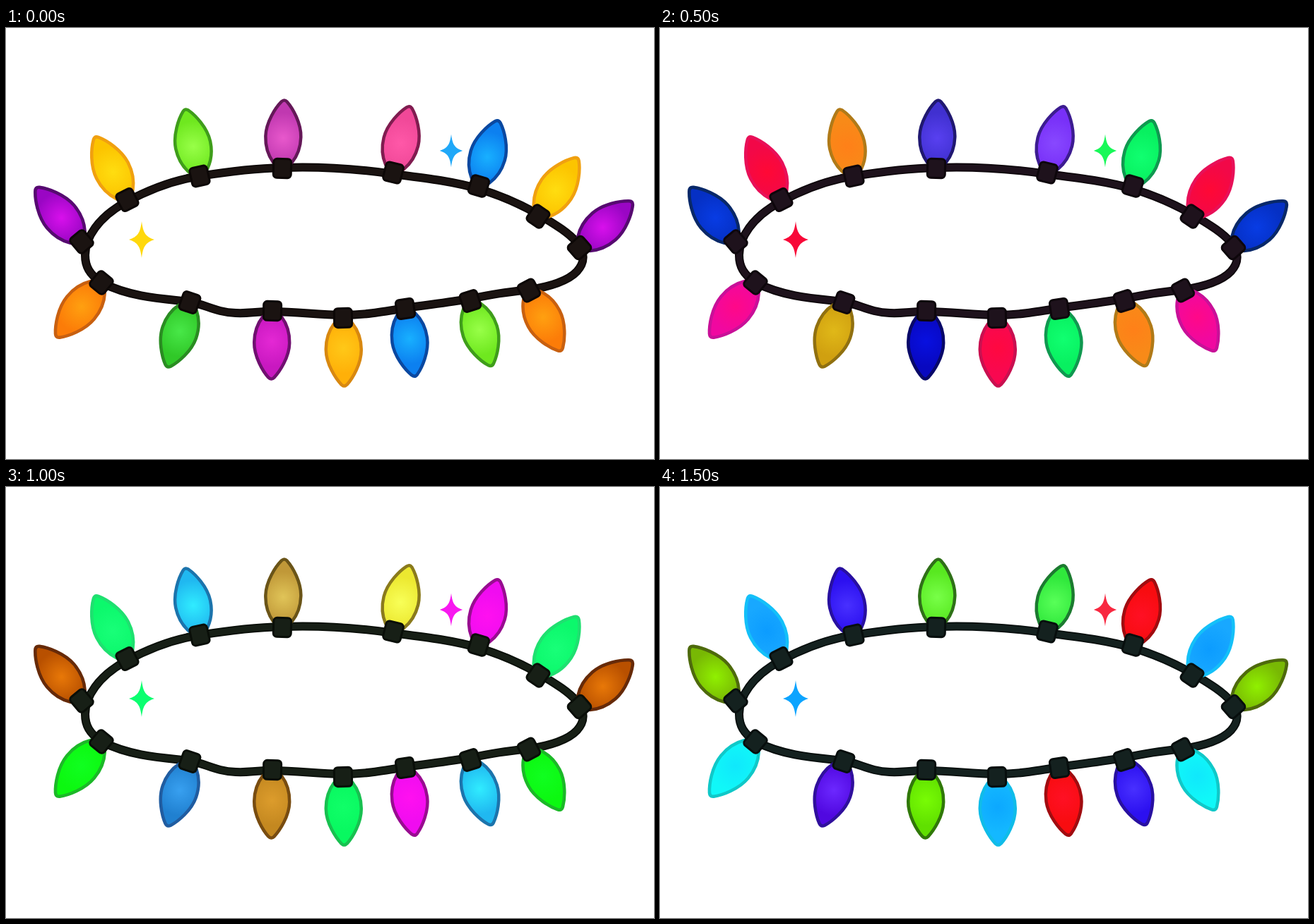
An HTML page that plays this animation: 917 px wide and 611 px high, repeating every 2 s.

```html
<!DOCTYPE html>
<html lang="en">
<head>
<meta charset="utf-8">
<title>String lights</title>
<style>
html, body { margin: 0; width: 100%; height: 100%; overflow: hidden; background: #fff; }
svg { display: block; width: 917px; height: 611px; }
</style>
</head>
<body>
<svg id="stage" viewBox="0 0 917 611"><defs id="defs"></defs></svg>
<script>
const LOOP = 2000;
const stage = document.getElementById('stage');
const defs = document.getElementById('defs');

// Four steps per palette: centre, edge, outline
const palettes = {
  purple:  ['#d810ec #9a06c4 #560a70', '#083ce4 #0530c4 #082868', '#e87808 #b85000 #662a08', '#90f000 #78b804 #4e6a0c'],
  yellow:  ['#ffdd10 #fcc400 #f0a010', '#ff0835 #f20848 #e81058', '#18ff78 #0cf86c #1fe070', '#0c9cff #18a8ff #14c0f8'],
  lime:    ['#98ff48 #6fe81f #3f9d1b', '#ff8018 #f88a18 #b07a18', '#30ecff #20b8f0 #1c74ac', '#4830ff #2c10f0 #2810a0'],
  orchid:  ['#e858cc #c038b0 #641858', '#5840f0 #4030d0 #201870', '#e0c458 #c09838 #6a5418', '#78ff48 #58e820 #2f7018'],
  pink:    ['#ff58a8 #f04898 #801c50', '#8848ff #7830f8 #3c1c90', '#f8ff58 #ece830 #8a7a1c', '#58ff58 #30e83c #1c7a30'],
  blue:    ['#18b0ff #0c80f0 #0a48a0', '#10ff70 #08f060 #109850', '#ff10f0 #f00cf0 #980c90', '#ff1024 #f80c10 #a00c10'],
  orange:  ['#ffa010 #fc7c08 #c86010', '#ff0888 #f008a0 #c81098', '#10ff20 #0cf810 #1cb828', '#10e8fc #10f8f8 #10c8c8'],
  green:   ['#48e848 #30c828 #2a8c22', '#e0b818 #d0a010 #907010', '#38a0f0 #2080d0 #205ca0', '#6c28ff #5008e0 #30109c'],
  magenta: ['#e428d4 #c818c0 #701070', '#0810e0 #0808c0 #080868', '#dc9c2c #c48820 #784c10', '#78fc04 #60e000 #307808'],
  amber:   ['#ffc818 #ffb008 #d88810', '#ff0840 #f80850 #c81050', '#10ff68 #08f860 #18c050', '#0ca8ff #14b8ff #10bce8']
};

// Socket centre, tilt in degrees, glass length, palette
const bulbs = [
  [107, 303, -40, 1.03, 'purple'], [171.5, 243.5, -27, 1.03, 'yellow'], [274, 210, -12, 1, 'lime'],
  [391, 199, 1.7, 1, 'orchid'], [548, 205, 14, 1, 'pink'], [669, 224, 16.5, 1, 'blue'],
  [753, 267, 34, 1.03, 'yellow'], [811.5, 311.5, 49, 1.02, 'purple'], [740, 372, 152, 1, 'orange'],
  [657, 387, 162, 1, 'lime'], [565, 398, 172, 1, 'blue'], [477, 411, 179, 1, 'amber'],
  [377, 401, 181, 1, 'magenta'], [260, 389, 199, 1, 'green'], [135, 361, 219.5, 1.03, 'orange']
];

const stars = [
  [192, 300, 1, ['#ffd80c', '#f80838', '#0cff70', '#0ca4ff']],
  [630, 174, 0.9, ['#20a8f8', '#18f858', '#f818f0', '#f82840']]
];

const wireFill = ['#1a1311', '#1e121c', '#171f16', '#14211f'];
const wireEdge = ['#0c0706', '#0d060b', '#090e08', '#070e0d'];

const wirePath = 'M112 322C112 298 130 268 171 246C208 226 240 215 274 210' +
  'C318 203 350 199 391 198C450 196 500 200 548 207C595 213 630 217 669 228' +
  'C702 238 730 251 753 264C780 280 797 291 808 304C820 318 819 333 808 345' +
  'C796 358 770 367 740 371C705 375 690 377 657 384C625 389 600 392 565 397' +
  'C530 403 505 407 477 407C440 407 415 402 377 402C350 402 345 405 325 404' +
  'C297 403 285 393 260 388C225 384 180 383 135 361C118 349 112 338 112 322Z';
const bulbPath = 'M-13-8C-21.5-19-25-32-25-45C-25-65-12-86-4-94.5' +
  'Q0-98.5 4-94.5C12-86 25-65 25-45C25-32 21.5-19 13-8Z';
const starPath = 'M0-26C2-9 6-4 18 0C6 4 2 9 0 26C-2 9-6 4-18 0C-6-4-2-9 0-26Z';

function add(parent, tag, attrs) {
  const el = document.createElementNS('http://www.w3.org/2000/svg', tag);
  for (const key in attrs) el.setAttribute(key, attrs[key]);
  return parent.appendChild(el);
}

// Hard colour changes at equal steps of the loop
function cycle(el, prop, colors) {
  const steps = [...colors, colors[0]].map((color, i) => ({
    [prop]: color, offset: i / colors.length, easing: 'step-end'
  }));
  el.animate(steps, { duration: LOOP, iterations: Infinity });
}

const shade = (name, i) => palettes[name].map(step => step.split(' ')[i]);

for (const name in palettes) {
  const glow = add(defs, 'radialGradient', {
    id: name, gradientUnits: 'userSpaceOnUse', cx: 0, cy: -43, r: 36
  });
  [0, 1].forEach(i => cycle(add(glow, 'stop', { offset: i }), 'stopColor', shade(name, i)));
}

for (const [width, colors] of [[12, wireEdge], [8.5, wireFill]]) {
  const wire = add(stage, 'path', { d: wirePath, fill: 'none', 'stroke-width': width });
  cycle(wire, 'stroke', colors);
}

for (const [x, y, tilt, length, name] of bulbs) {
  const g = add(stage, 'g', { transform: `translate(${x} ${y}) rotate(${tilt})` });
  const glass = add(g, 'path', {
    d: bulbPath, transform: `scale(1 ${length})`, fill: `url(#${name})`,
    'stroke-width': 4.5, 'stroke-linejoin': 'round'
  });
  cycle(glass, 'stroke', shade(name, 2));
  const socket = add(g, 'rect', { x: -12.5, y: -13.5, width: 25, height: 27, rx: 5, 'stroke-width': 3 });
  cycle(socket, 'fill', wireFill);
  cycle(socket, 'stroke', wireEdge);
}

for (const [x, y, size, colors] of stars) {
  const star = add(stage, 'path', { d: starPath, transform: `translate(${x} ${y}) scale(${size})` });
  cycle(star, 'fill', colors);
}
</script>
</body>
</html>
```
